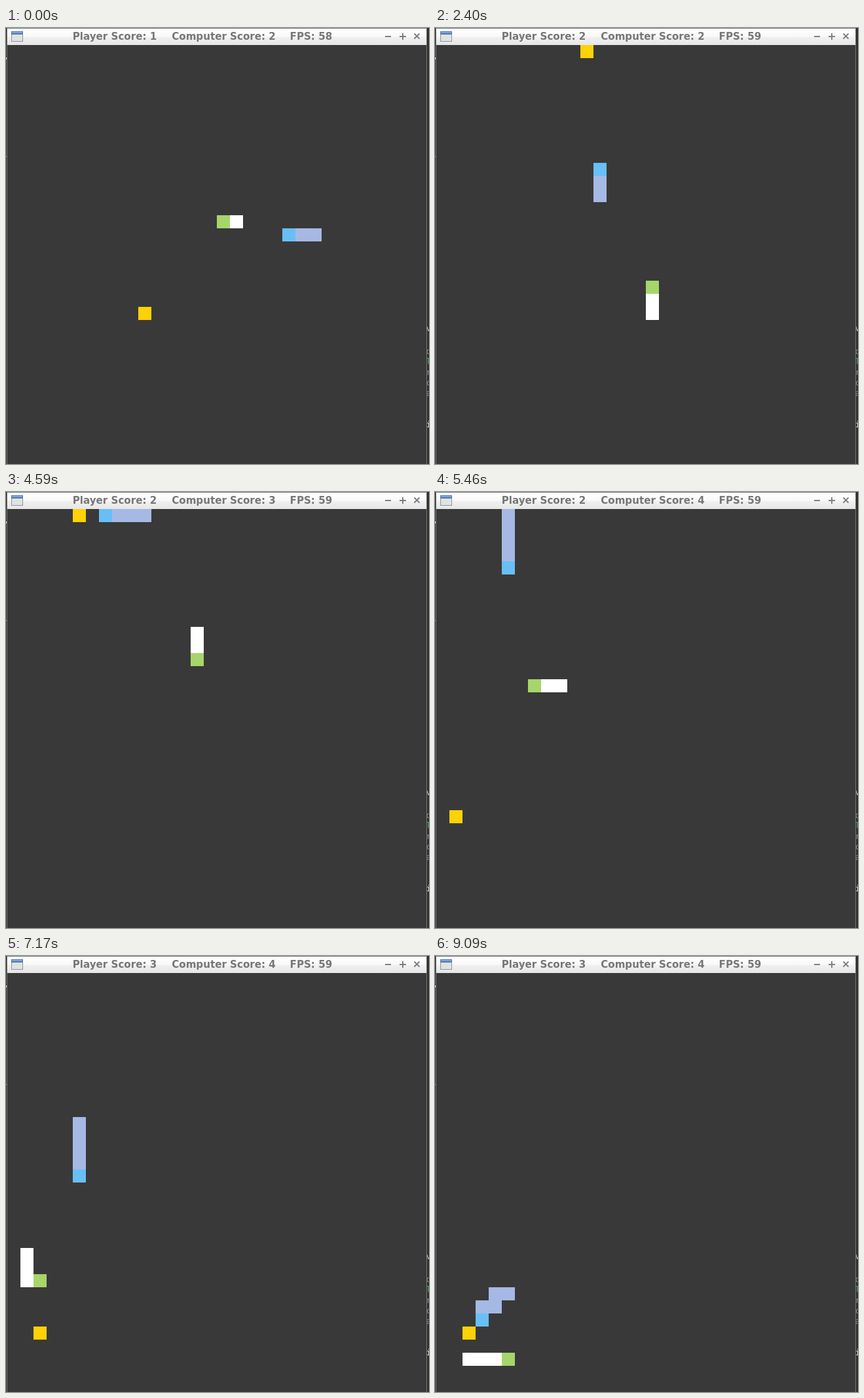
Animation of 646x666 px, one loop 9.21 s. Source, as an HTML page with a canvas:

```html
<!DOCTYPE html>
<html lang="en">
<head>
<meta charset="utf-8">
<title>Snake duel</title>
<style>
html, body { margin: 0; width: 100%; height: 100%; overflow: hidden; background: #393939; }
canvas { display: block; }
</style>
</head>
<body>
<canvas id="stage" width="646" height="666"></canvas>
<script>
const ctx = document.getElementById('stage').getContext('2d');
const LOOP = 9210, FRAME = 30, CELL = 20, LEFT = 2, TOP = 26;
const PLAYER_STEP = 102.1;
const HOLDS = [[1830, 1950], [6390, 6510], [8430, 8520], [9090, 9210]];
// Time against steps made by the computer's snake
const COMPUTER_PACE = [[0, 0.3], [2400, 16.3], [3270, 21.7], [4590, 30.5],
  [6390, 42.2], [7920, 51.9], [9090, 60.02]];
const DIRS = { L: [-1, 0], R: [1, 0], U: [0, -1], D: [0, 1] };

function walk(x, y, moves) {
  const cells = [[x, y]];
  for (const [, dir, count] of moves.matchAll(/([LRUD])(\d+)/g)) {
    for (let i = 0; i < +count; i++) {
      x += DIRS[dir][0];
      y += DIRS[dir][1];
      cells.push([x, y]);
    }
  }
  return cells;
}

const player = { path: walk(17, 13, 'L8D7R7U8R2U5L4D6L13D10R5D3L5D3R4'),
  offset: 1, meals: [15, 69], score: 1, head: '#a6d66a', body: '#ffffff' };
const computer = { path: walk(23, 14, 'L10D1L1U14L1U1L6D24L1D1L1D1'),
  offset: 2, meals: [26, 32], score: 2, head: '#68bff6', body: '#a6b9e4' };
const foods = [[10, 20], [11, 0], [5, 0], [1, 23], [2, 27]];

function computerSteps(t) {
  let i = 0;
  while (i < COMPUTER_PACE.length - 2 && t >= COMPUTER_PACE[i + 1][0]) i++;
  const [t0, s0] = COMPUTER_PACE[i], [t1, s1] = COMPUTER_PACE[i + 1];
  return Math.floor(s0 + (s1 - s0) * (t - t0) / (t1 - t0));
}

const eaten = (snake, step) => snake.meals.filter(m => step >= m).length;

function stateAt(t) {
  const p = Math.floor(t / PLAYER_STEP), c = computerSteps(t);
  const pm = eaten(player, p), cm = eaten(computer, c);
  return { p, c, food: foods[pm + cm],
    playerScore: player.score + pm, computerScore: computer.score + cm };
}

function rect(x, y, w, h, color) {
  ctx.fillStyle = color;
  ctx.fillRect(x, y, w, h);
}

function cell([x, y], color) {
  rect(LEFT + x * CELL, TOP + y * CELL, CELL, CELL, color);
}

function drawSnake(snake, step, score) {
  const at = step + snake.offset;
  for (let i = score; i >= 0; i--) {
    cell(snake.path[Math.max(0, at - i)], i ? snake.body : snake.head);
  }
}

function line(x0, y0, x1, y1) {
  ctx.beginPath();
  ctx.moveTo(x0, y0);
  ctx.lineTo(x1, y1);
  ctx.stroke();
}

function drawEdges() {
  rect(0, 0, 646, 666, '#303030');
  rect(0, 45, 1, 3, '#dddddd');
  rect(0, 196, 1, 1, '#aaaaaa');
  ctx.save();
  ctx.beginPath();
  ctx.rect(643, 27, 3, 639);
  ctx.clip();
  ctx.font = '13px "DejaVu Sans Mono", monospace';
  const scraps = [['v', 463, '#cccccc'], ['o', 498, '#8a9090'], ['l', 514, '#5fa86a'],
    ['r', 530, '#7d9494'], ['c', 546, '#7d9494'], ['a', 562, '#7d9494'], ['i', 610, '#dddddd']];
  for (const [ch, y, color] of scraps) {
    ctx.fillStyle = color;
    ctx.fillText(ch, 641.5, y);
  }
  ctx.restore();
  rect(1, 0, 642, 666, '#777777');
  rect(2, TOP, 640, 640, '#393939');
}

function drawTitle(t) {
  const bar = ctx.createLinearGradient(0, 1, 0, TOP);
  bar.addColorStop(0, '#ffffff');
  bar.addColorStop(0.45, '#fafafa');
  bar.addColorStop(0.55, '#f0f0f0');
  bar.addColorStop(1, '#e6e6e6');
  rect(2, 1, 640, TOP - 1, bar);

  rect(8, 5, 18, 16, '#8f9499');
  rect(9, 6, 16, 14, '#dfe2e4');
  rect(8, 5, 18, 5, '#5378b0');
  rect(9, 6, 16, 2, '#86a6d4');

  ctx.strokeStyle = '#808080';
  ctx.lineWidth = 2;
  line(579, 13, 588, 13);
  line(601, 13, 611, 13);
  line(606, 8, 606, 18);
  line(623.5, 8.5, 631.5, 16.5);
  line(631.5, 8.5, 623.5, 16.5);

  // The caption refreshes about once a second
  const tick = t < 930 ? 0 : 930 + 1020 * Math.floor((t - 930) / 1020);
  const s = stateAt(tick);
  const fps = tick === 0 || tick === 6030 ? 58 : 59;
  ctx.font = 'bold 15.1px "DejaVu Sans", sans-serif';
  ctx.fillStyle = '#777777';
  ctx.fillText('Player Score: ' + s.playerScore, 101.8, 18);
  ctx.fillText('Computer Score: ' + s.computerScore, 253.2, 18);
  ctx.fillText('FPS: ' + fps, 433.6, 18);
}

function draw(now) {
  let t = Math.floor((now % LOOP) / FRAME) * FRAME;
  for (const [from, to] of HOLDS) if (t >= from && t < to) t = from;
  const s = stateAt(t);
  drawEdges();
  drawTitle(t);
  cell(s.food, '#fdd206');
  drawSnake(player, s.p, s.playerScore);
  drawSnake(computer, s.c, s.computerScore);
}

let start;
function loop(now) {
  if (start === undefined) start = now;
  draw(Math.max(0, now - start));
  requestAnimationFrame(loop);
}
draw(0);
requestAnimationFrame(loop);
</script>
</body>
</html>
```
